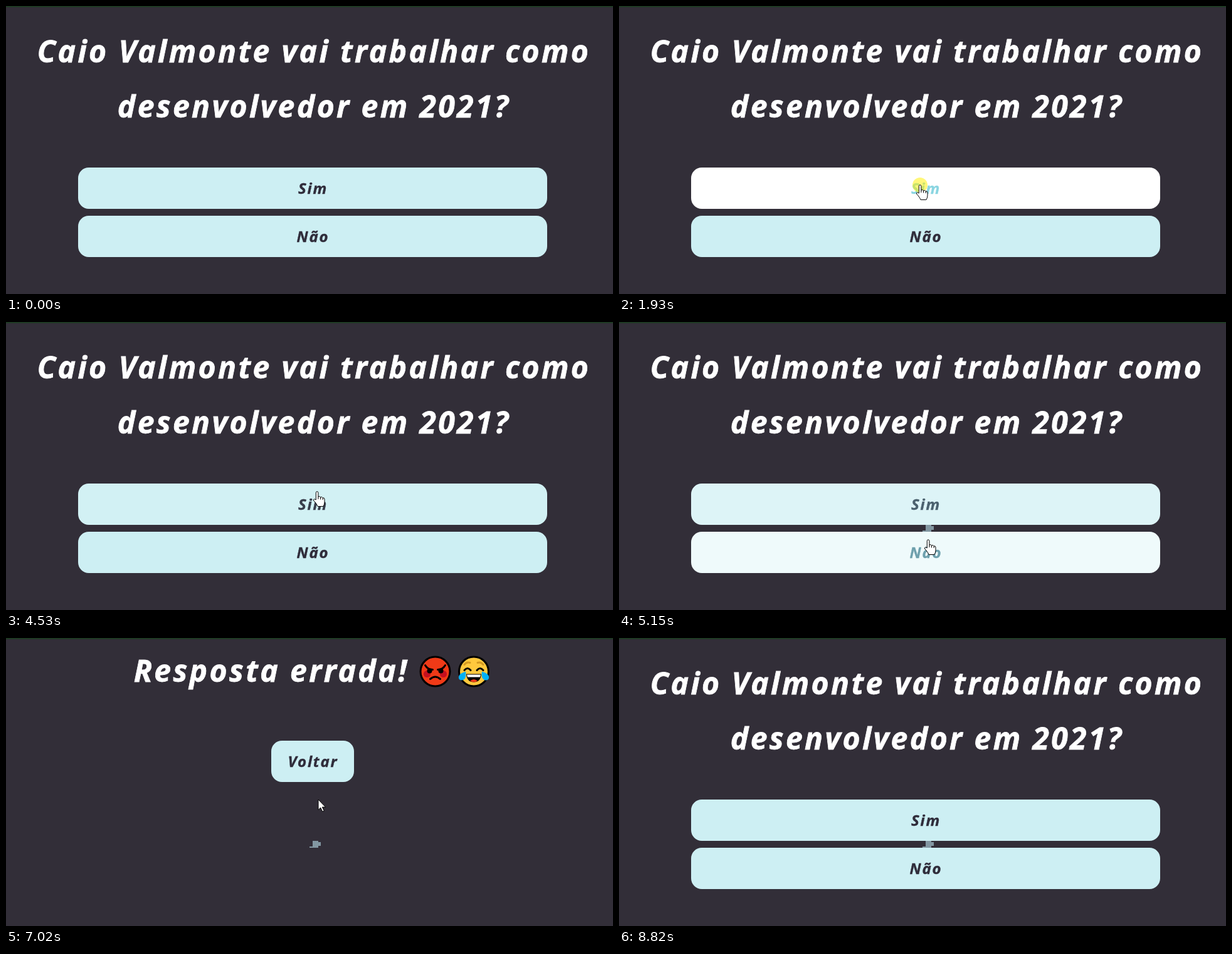
Write an HTML page that moves like this. It is 968 px wide and 460 px high and loops after 9300 ms.

```html
<!DOCTYPE html>
<html lang="pt-BR">
<head>
<meta charset="utf-8">
<title>Quiz</title>
<style>
  html, body { margin: 0; width: 100%; height: 100%; overflow: hidden; background: #322e38; }
  svg { display: block; width: 968px; height: 460px; }
  text {
    font: italic bold 48px "Open Sans", "Noto Sans", sans-serif; letter-spacing: 3.4px; text-anchor: middle;
    color: #fff; fill: currentColor; stroke: currentColor; stroke-width: .8px;
  }
  .button text { font-size: 24px; letter-spacing: 1.8px; stroke-width: .4px; }
</style>
</head>
<body>
<svg viewBox="0 0 968 460">
  <rect width="968" height="460" fill="#322e38"/>
  <rect width="968" height="2" fill="#1f3a24"/>

  <g id="question">
    <text x="491" y="90">Caio Valmonte vai trabalhar como</text>
    <text x="491" y="178">desenvolvedor em 2021?</text>
    <g class="button" id="yes">
      <rect x="115" y="258" width="748" height="66" rx="17"/>
      <text x="489.5" y="300">Sim</text>
    </g>
    <g class="button" id="no">
      <rect x="115" y="335" width="748" height="66" rx="17"/>
      <text x="489.5" y="377">Não</text>
    </g>
  </g>

  <g id="right">
    <text x="424" y="70">Certa Resposta!</text>
    <!-- dartboard -->
    <g transform="translate(667 53.5)">
      <circle r="25"/>
      <circle r="22" fill="#f03a17"/>
      <circle r="16" fill="#fff"/>
      <circle r="11" fill="#f03a17"/>
      <circle r="5.5" fill="#fff"/>
      <path d="M0 0L14-14" stroke="#0063b1" stroke-width="4" stroke-linecap="round"/>
      <path d="M5-5L4-13 16-24H25V-15L13-4z" fill="#30c3f7" stroke="#000" stroke-width="1.5" stroke-linejoin="round"/>
      <path d="M5-5L18-18" stroke="#0078d7" stroke-width="3"/>
    </g>
    <!-- clapping hands -->
    <g stroke-linejoin="round" stroke-linecap="round">
      <path d="M711 37l6 5M725 32l1 7M739 36l-4 6" stroke="#000" stroke-width="10"/>
      <path d="M706 56q0-7 6-9 3-5 8-4 5-4 9 2l7 6q-1-8 5-7 6 1 7 10l1 10q0 12-12 13-14 2-22-6-9-8-9-15z" fill="#ffc83d" stroke="#000" stroke-width="5"/>
      <path d="M706 56q0-7 6-9l14 27q-17-5-20-18z" fill="#d08b16"/>
      <path d="M711 50l16 16M715 45l17 17M722 43l14 14" fill="none" stroke="#ffc83d" stroke-width="6"/>
      <path d="M711 54l13 13M716 49l13 13M722 47l12 12" fill="none" stroke="#c98a1b" stroke-width="1.4"/>
      <path d="M712 38l5 4M725 33l1 5M738 36l-3 5" stroke="#f7630c" stroke-width="5"/>
    </g>
  </g>

  <g id="wrong">
    <text x="423" y="70">Resposta errada!</text>
    <!-- angry face -->
    <g transform="translate(684.5 53.5)" fill="none" stroke="#000" stroke-width="3" stroke-linecap="round">
      <circle r="23.5" fill="#f03a17"/>
      <g fill="#c50f1f" stroke="none"><circle cx="-13" cy="4" r="5.5"/><circle cx="13" cy="4" r="5.5"/></g>
      <path d="M-16-10q4 7 12 7M16-10q-4 7-12 7M-8 12q8-7 16 0"/>
      <g fill="#000" stroke="none"><circle cx="-9" cy="-1" r="4"/><circle cx="9" cy="-1" r="4"/></g>
    </g>
    <!-- laughing face -->
    <g transform="translate(746 53.5)" fill="none" stroke="#000" stroke-width="3" stroke-linecap="round">
      <circle r="23.5" fill="#ffc83d"/>
      <path d="M-15-11q4-5 9-3M15-11q-4-5-9-3" stroke="#d49a22"/>
      <path d="M-15-2q5-6 10 0M5-2q5-6 10 0"/>
      <g stroke="none">
        <path d="M-12 4H12Q11 17 0 17T-12 4z" fill="#000"/>
        <path d="M-11 5H11L10 9H-10z" fill="#fff"/>
        <path d="M-6 15q6-5 12 0-6 4-12 0z" fill="#f03a17"/>
        <path d="M-13 0q2 13-6 14-6 0-5-6 1-5 11-8zM13 0q-2 13 6 14 6 0 5-6-1-5-11-8z" fill="#00b0f5"/>
      </g>
    </g>
  </g>

  <g class="button" id="back">
    <rect x="423" y="164" width="132" height="66" rx="17"/>
    <text x="489.5" y="206">Voltar</text>
  </g>

  <path id="smudge" d="M489 324h9v2h4v6h-4v3h-14v-2h5z" fill="#8297a2"/>
  <g id="cursor">
    <circle id="press" r="12" fill="#fff000" opacity=".52"/>
    <g id="hand" stroke="#000" fill="none">
      <path fill="#fff" d="M-1.7 13V1.6a1.8 1.8 0 0 1 3.6 0V8q3-1.2 3.6.8 3-1 3.6 1Q12 9.400 12 12v5q0 3-2 6.500H1Q0 20-5.500 14q-.5-3.500 3.800-1z"/>
      <path d="M1.900 8v4M5.500 9v3.500M9.100 10v3"/>
    </g>
    <path id="arrow" fill="#fff" stroke="#000" d="M0 0V16.500l3.700-3.500 3 6.300 2.600-1.200-3-6H11.500z"/>
  </g>
</svg>
<script>
const LOOP = 9300, FADE = 300, HOVER_LAG = 30, PRESS = 150, LOAD = 200;
const $ = id => document.getElementById(id);
const show = (id, on) => $(id).setAttribute('display', on ? 'inline' : 'none');

const clicks = [1930, 3730, 5930, 7720];
const pages = ['question', 'right', 'question', 'wrong', 'question'];
const buttonsOn = page => page === 'question' ? ['yes', 'no'] : ['back'];

const entry = { x: 859, y: 452 };
const moves = [
  { start: 70, end: 1070, to: { x: 480, y: 286 }, bend: { x: 640, y: 420 } },
  { start: 2710, end: 3250, to: { x: 499, y: 204 } },
  { start: 4210, end: 5540, to: { x: 492, y: 361 } },
  { start: 6650, end: 7570, to: { x: 502, y: 201 } },
  { start: 7950, end: 8820, to: { x: 897, y: 458 }, bend: { x: 760, y: 425 } }
];

const pageAt = t => pages[clicks.filter(click => t >= click + LOAD).length];
const moveAt = t => moves.findLast(move => t >= move.start) ?? moves[0];

// Each move slows down along a quadratic curve.
function pointerAt(t) {
  const move = moveAt(t), { to } = move;
  const from = moves[moves.indexOf(move) - 1]?.to ?? entry;
  const progress = Math.min(1, Math.max(0, (t - move.start) / (move.end - move.start)));
  const u = 1 - (1 - progress) ** 2;
  const along = axis => {
    const middle = move.bend?.[axis] ?? (from[axis] + to[axis]) / 2;
    return from[axis] * (1 - u) ** 2 + 2 * middle * u * (1 - u) + to[axis] * u * u;
  };
  return { x: along('x'), y: along('y') };
}

// The hovered button is only updated while the pointer moves.
function hoveredAt(t) {
  const seen = Math.min(t, moveAt(t).end);
  const { x, y } = pointerAt(seen);
  return buttonsOn(pageAt(seen)).findLast(id => {
    const box = $(id).firstElementChild.getBBox();
    const gap = id === 'yes' ? 11 : 0;
    return x >= box.x && x < box.x + box.width && y >= box.y && y < box.y + box.height + gap;
  });
}

function findHovers() {
  const hovers = { yes: [], no: [], back: [] };
  let previous;
  for (let t = 0; t < LOOP; t += 10) {
    const id = hoveredAt(t);
    if (id === previous) continue;
    if (previous) hovers[previous].at(-1).leave = t + HOVER_LAG;
    if (id) hovers[id].push({ enter: t + HOVER_LAG, leave: Infinity });
    previous = id;
  }
  return hovers;
}

// CSS "ease": cubic-bezier(.25, .1, .25, 1)
function ease(x) {
  if (x <= 0) return 0;
  if (x >= 1) return 1;
  let low = 0, high = 1, s;
  for (let i = 0; i < 16; i++) {
    s = (low + high) / 2;
    if (.75 * s * (1 - s) + s ** 3 < x) low = s; else high = s;
  }
  return .3 * s * (1 - s) ** 2 + 3 * s * s * (1 - s) + s ** 3;
}

function hoverLevel(t, spans) {
  const span = spans.findLast(({ enter }) => t >= enter);
  if (!span) return 0;
  const { enter, leave } = span;
  if (t < leave) return ease((t - enter) / FADE);
  const peak = ease((leave - enter) / FADE);
  return peak * (1 - ease((t - leave) / (FADE * peak)));
}

const hovers = findHovers();

function draw(t) {
  const page = pageAt(t);
  for (const id of ['question', 'right', 'wrong']) show(id, id === page);
  show('back', page !== 'question');

  for (const id in hovers) {
    const percent = hoverLevel(t, hovers[id]) * 100;
    const [box, label] = $(id).children;
    box.style.fill = `color-mix(in srgb, #fff ${percent}%, #cdeff3)`;
    label.style.color = `color-mix(in srgb, #8ad5e1 ${percent}%, #2f2c3a)`;
  }

  const { x, y } = pointerAt(t);
  const onButton = Boolean(hoveredAt(t));
  $('cursor').setAttribute('transform', `translate(${Math.round(x)} ${Math.round(y)})`);
  show('cursor', t >= moves[0].start && t < moves.at(-1).end);
  show('arrow', !onButton);
  show('hand', onButton);
  show('press', clicks.some(click => t >= click && t < click + PRESS));
  show('smudge', t >= 5070);
}

const start = performance.now();
function frame() {
  draw((performance.now() - start) % LOOP);
  requestAnimationFrame(frame);
}
frame();
</script>
</body>
</html>
```
